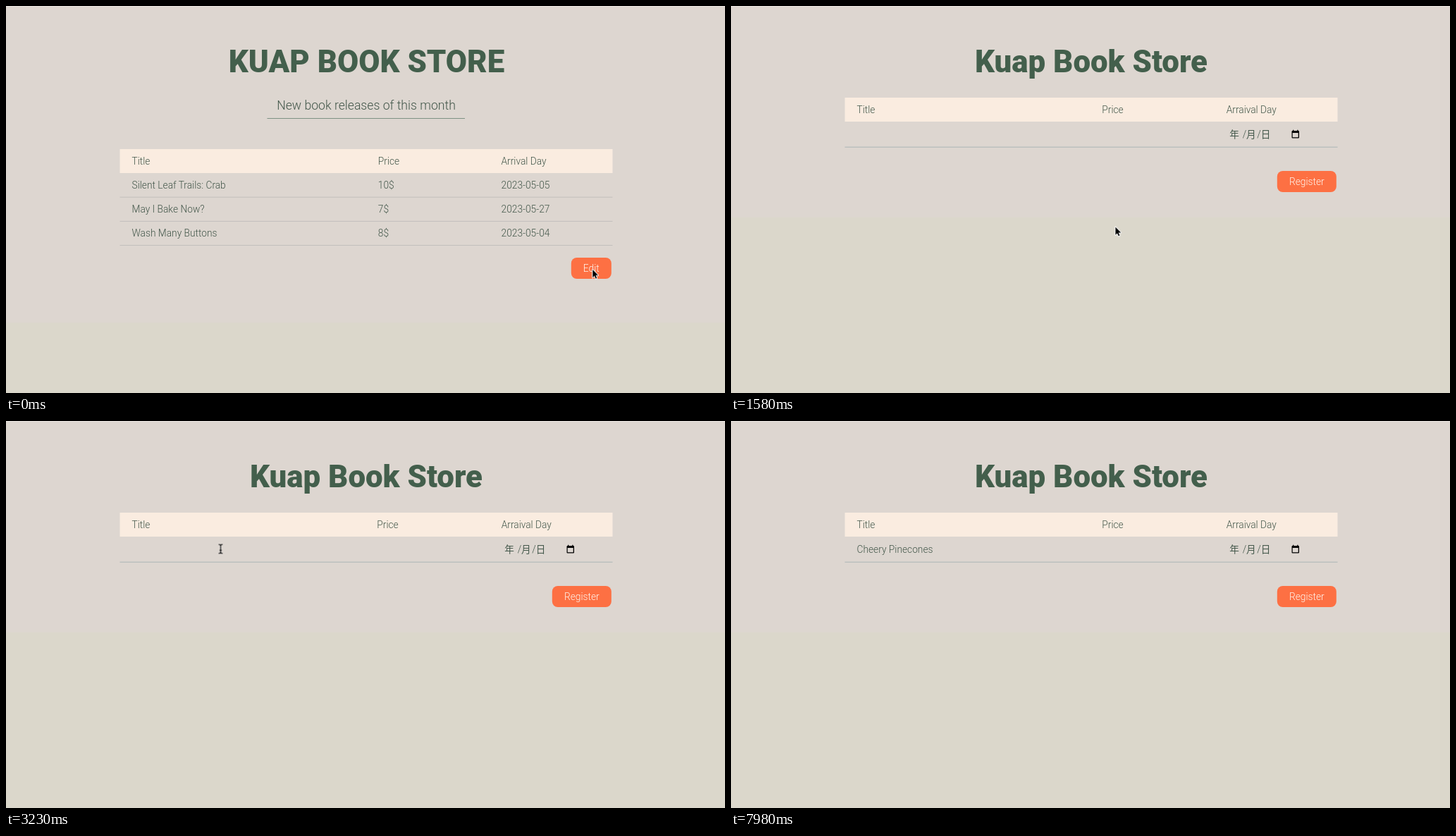
An HTML page for the animation above (8000 ms loop, 1020 by 549 pixels).

```html
<!DOCTYPE html>
<html lang="en">
<head>
<meta charset="utf-8">
<title>Book store</title>
<style>
  html, body { margin: 0; width: 100%; height: 100%; overflow: hidden; background: #dbd7cb; }
  svg { display: block; width: 100vw; height: 100vh; }

  text { font: 300 13.75px Roboto, sans-serif; fill: #43574a; white-space: pre; }
  .heading { font-size: 43.8px; font-weight: 800; fill: #435f4c; text-anchor: middle; }
  .subtitle { font-size: 17.65px; text-anchor: middle; }
  .date { font-family: "Noto Sans CJK JP", "Noto Sans CJK", sans-serif; font-size: 13.6px; }
  .label { fill: #fff6ee; text-anchor: middle; }
  .panel { fill: #ddd6d0; }
  .band { fill: #faece0; }
  .button { fill: #fd7043; }
  .rule { stroke: #c2bfbc; }
  .field-rule { stroke: #bbc0be; stroke-width: 1.4; }
  .title-rule { stroke: #7d9283; stroke-width: 1.2; }

  .list, .form, .arrow, .beam, #caret { animation: 8s step-end infinite; }
  .list { animation-name: list; }
  .form { animation-name: form; }
  .arrow { animation-name: arrow; }
  .beam { animation-name: beam; }
  #caret { animation-name: blink; fill: #43574a; }
  .pointer { animation: travel 8s linear infinite; }

  @keyframes list { 0% { opacity: 1 } 14.125%, 100% { opacity: 0 } }
  @keyframes form { 0% { opacity: 0 } 14.125%, 100% { opacity: 1 } }
  @keyframes arrow { 0% { opacity: 1 } 31%, 100% { opacity: 0 } }
  @keyframes beam { 0% { opacity: 0 } 31% { opacity: 1 } 48.5%, 100% { opacity: 0 } }
  @keyframes blink {
    0% { opacity: 0 } 33.75% { opacity: 1 } 40.375% { opacity: 0 }
    46.625% { opacity: 1 } 98.125%, 100% { opacity: 0 }
  }
  @keyframes travel {
    0%, 18.4% { transform: translate(832px, 373.5px); animation-timing-function: ease-in }
    19.75% { transform: translate(547px, 314px); animation-timing-function: cubic-bezier(.15, .6, .4, 1) }
    26%, 30% { transform: translate(318.5px, 191px); animation-timing-function: ease-out }
    33.75%, 100% { transform: translate(304.5px, 181.5px) }
  }
</style>
</head>
<body>
<svg viewBox="0 0 1020 549" preserveAspectRatio="none">
  <defs>
    <path id="ibeam" d="M-2.8-6.4Q0-6.4 0-4.8Q0-6.4 2.8-6.4M0-5V5M-2.8 6.4Q0 6.4 0 4.8Q0 6.4 2.8 6.4M-1.5 1.8h3"/>
  </defs>
  <rect width="1020" height="549" fill="#dbd7cb"/>

  <g class="list">
    <rect class="panel" width="1020" height="449"/>
    <text class="heading" x="511.5" y="94">KUAP BOOK STORE</text>
    <text class="subtitle" x="511" y="146.5">New book releases of this month</text>
    <path class="title-rule" d="M370.5 159.5H651"/>
    <rect class="band" x="161.5" y="203" width="699" height="34"/>
    <g id="rows"></g>
    <path class="rule" d="M161.5 271.2h699m-699 34.2h699m-699 34.1h699"/>
    <rect class="button" x="801.8" y="357" width="57" height="30" rx="8"/>
    <text class="label" x="830.3" y="376.7">Edit</text>
  </g>

  <g class="form">
    <rect class="panel" width="1020" height="300"/>
    <text class="heading" x="511" y="94">Kuap Book Store</text>
    <rect class="band" x="161.5" y="130" width="699" height="34"/>
    <text x="178.5" y="151.7">Title</text>
    <text x="526.3" y="151.7">Price</text>
    <text x="702.7" y="151.7">Arraival Day</text>
    <text id="entry" x="178.5" y="186.7"></text>
    <rect id="caret" x="178.5" y="174" width="1" height="16"/>
    <text class="date" x="707.3" y="187">年</text>
    <text x="725.7" y="186.7">/</text>
    <text class="date" x="731" y="187">月</text>
    <text x="746.3" y="186.7">/</text>
    <text class="date" x="751.8" y="187">日</text>
    <path fill-rule="evenodd" d="M797 175.8h1.3v1.2h4.9v-1.2h1.3v1.2h.4q1.1 0 1.1 1.1v8.3q0 1.1-1.1 1.1h-8.3q-1.1 0-1.1-1.1v-8.3q0-1.1 1.1-1.1h.4zM796.7 179.9v6.4h8v-6.4z"/>
    <path class="field-rule" d="M161.5 200.2h699"/>
    <rect class="button" x="774.8" y="234" width="84" height="30" rx="8"/>
    <text class="label" x="816.8" y="253.7">Register</text>
  </g>

  <rect width="1020" height="1" fill="#e8e4df"/>

  <g class="pointer">
    <path class="arrow" d="M.3 .5v11.2l2.5-2.4 1.8 4 1.7-.7-1.8-4h3.6z"
      stroke="#fff" stroke-width="2" stroke-linejoin="round" paint-order="stroke"/>
    <g class="beam" fill="none">
      <use href="#ibeam" stroke="#fff" stroke-opacity=".5" stroke-width="2.4"/>
      <use href="#ibeam" stroke="#000" stroke-width="1.2"/>
    </g>
  </g>
</svg>
<script>
  const table = [
    ['Title', 'Price', 'Arrival Day'],
    ['Silent Leaf Trails: Crab', '10$', '2023-05-05'],
    ['May I Bake Now?', '7$', '2023-05-27'],
    ['Wash Many Buttons', '8$', '2023-05-04'],
  ];
  const columns = [178.5, 527.8, 702.5];
  document.getElementById('rows').innerHTML = table.map((row, r) =>
    row.map((cell, c) => `<text x="${columns[c]}" y="${224.7 + r * 34.2}">${cell}</text>`).join('')
  ).join('');

  const title = 'Cheery Pinecones';
  const keyTimes = [3880, 4300, 4430, 4580, 4830, 4980, 5200, 5530,
                    5830, 5980, 6230, 6600, 6880, 7030, 7180, 7350];
  const entry = document.getElementById('entry');
  const caret = document.getElementById('caret');
  const clock = caret.getAnimations()[0];

  // Typing follows the same clock as the CSS animations.
  function draw() {
    const time = (clock.currentTime || 0) % 8000;
    const typed = title.slice(0, keyTimes.filter(key => key <= time).length);
    if (entry.textContent !== typed) entry.textContent = typed;
    const width = typed ? entry.getComputedTextLength() : 0;
    caret.setAttribute('x', Math.round(178 + width));
    requestAnimationFrame(draw);
  }
  draw();
</script>
</body>
</html>
```
